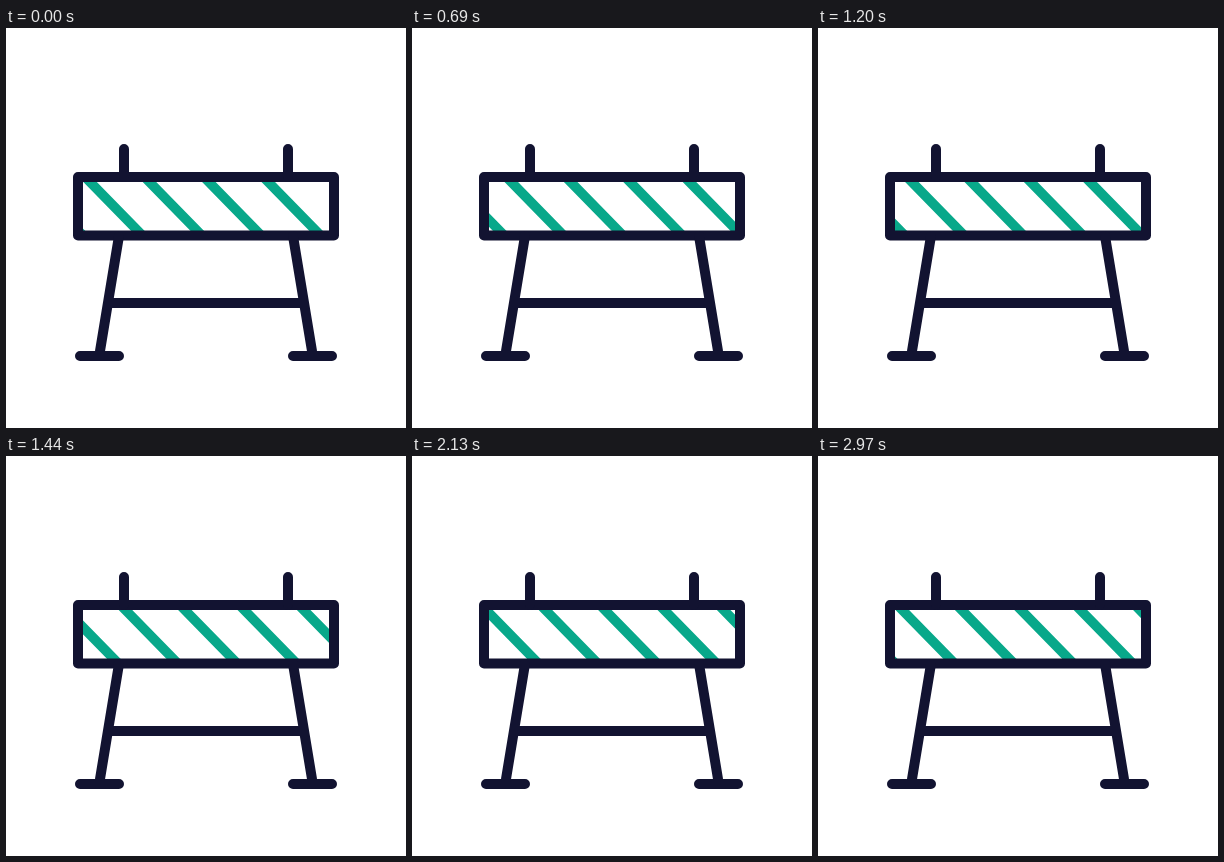
Write an HTML page that moves like this. It is 400x400 px and loops after 3.12 s.

```html
<!DOCTYPE html>
<html lang="en">
<head>
<meta charset="utf-8">
<title>Road barrier</title>
<style>
  html, body { margin: 0; width: 100%; height: 100%; overflow: hidden; background: #fff; }
  svg { display: block; width: 100vw; height: 100vh; }
  .frame { fill: none; stroke: #121331; stroke-width: 10; stroke-linecap: round; stroke-linejoin: round; }
  #stripes { fill: none; stroke: #08a88a; stroke-width: 9.7; }
</style>
</head>
<body>
<svg viewBox="0 0 400 400">
  <clipPath id="board"><rect x="72" y="149" width="256" height="58.5"/></clipPath>
  <g clip-path="url(#board)"><path id="stripes"/></g>
  <g class="frame">
    <rect x="72" y="149" width="256" height="58.5"/>
    <path d="M118 121V149M282 121V149M113 208L94 323M287 208L306 323M103 275H297M74 328H113M287 328H326"/>
  </g>
</svg>
<script>
const LOOP = 3120, STEP = 30, LAST = 99;
const GAP = 59.4, COUNT = 10;
// Nearly steady travel as [step, distance], followed by a braking phase
const keys = [[0, 0], [15, 49.4], [31, 99.8], [48, 154.2], [71, 227.6], [83, 266.6]];
const [brakeAt, brakeFrom] = keys[keys.length - 1];
const stopAt = 5 * GAP + 0.2;

function travel(n) {
  if (n >= brakeAt) {
    const u = (n - brakeAt) / (LAST - brakeAt);
    return brakeFrom + (stopAt - brakeFrom) * (1 - (1 - u) ** 1.69);
  }
  const i = keys.findIndex(k => k[0] > n);
  const [n0, d0] = keys[i - 1], [n1, d1] = keys[i];
  return d0 + (d1 - d0) * (n - n0) / (n1 - n0);
}

const stripes = document.getElementById("stripes");

function draw(now) {
  const n = Math.min(LAST, Math.floor(now % LOOP / STEP));
  const shift = travel(n);
  let d = "";
  for (let k = 0; k < COUNT; k++) {
    const x = 261.3 - k * GAP + shift;
    d += `M${x - 19.56} 133l88.02 90`;
  }
  stripes.setAttribute("d", d);
}

const start = performance.now();
function tick() {
  draw(performance.now() - start);
  requestAnimationFrame(tick);
}
tick();
</script>
</body>
</html>
```
